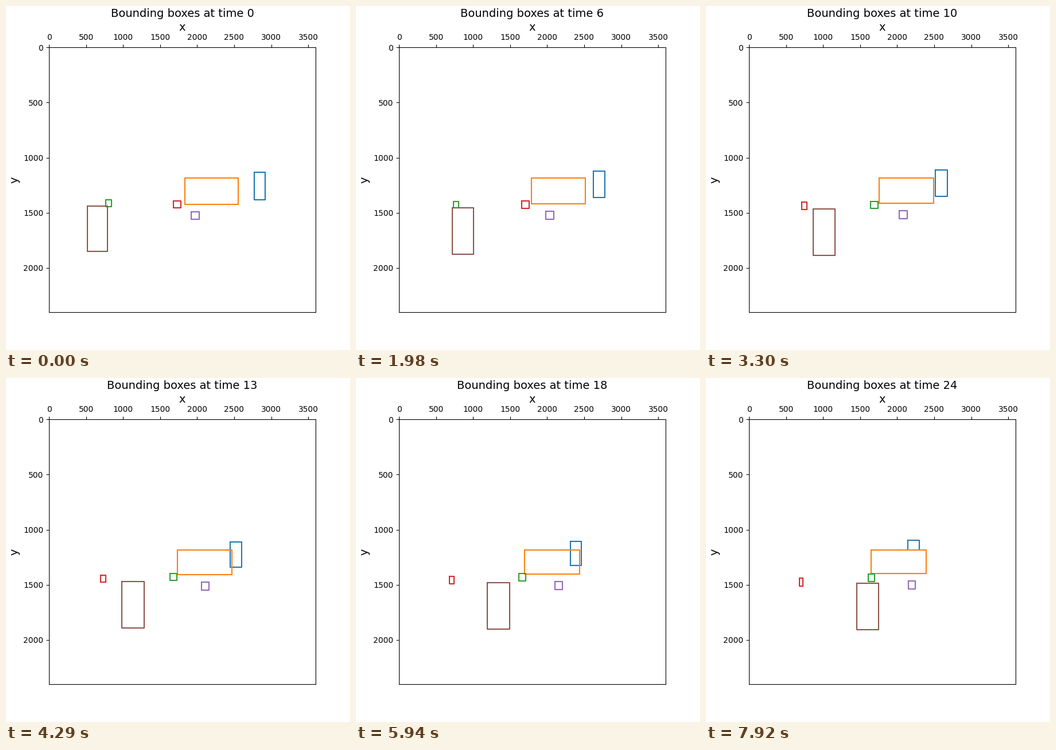
A matplotlib script for the animation above (8 s loop, 600 px wide and 600 px high).

```python
import numpy as np
import matplotlib.pyplot as plt
from matplotlib.animation import FuncAnimation

LOOP, TICK, STEP = 8000, 20, 330
X_MAX, Y_MAX = 3600, 2400
LEFT, TOP, WIDTH, HEIGHT = 75, 72, 465, 462

# Edge positions in stage pixels at these times; a cubic runs through each row.
KEY_TIMES = [0, 8, 16, 24]
TRACKS = {
    "tower": dict(left=[433, 407, 380.4, 352], right=[451.7, 427.6, 400.3, 371.8],
                  top=[290, 287, 285, 283], bottom=[338, 332.7, 328, 323]),
    "wide": dict(left=[312, 304, 296, 288], right=[405, 398.6, 391.8, 384.4],
                 top=[300, 300, 300, 300], bottom=[346, 344.2, 342.4, 340.8]),
    "west": dict(left=[173.8, 168.6, 164, 163], right=[184, 177, 172, 169.2],
                 top=[338.3, 341.4, 345.2, 349.2], bottom=[350, 354, 358, 362.6]),
    "mid": dict(left=[292, 288, 285, 283], right=[305, 301, 297, 294],
                top=[340, 340.6, 341.3, 342], bottom=[352.3, 353, 353.7, 354.6]),
    "low": dict(left=[323, 334, 344.3, 353], right=[337, 348, 357.5, 365],
                top=[359, 357.6, 355.7, 353.6], bottom=[372.4, 371.2, 369.7, 367.7]),
    "tall": dict(left=[141.6, 177.3, 218, 263], right=[177, 215, 257, 301],
                 top=[349, 353, 356, 358.3], bottom=[428.2, 433.9, 437.3, 439.3]),
}
CURVES = {name: {edge: np.polyfit(KEY_TIMES, keys, 3) for edge, keys in edges.items()}
          for name, edges in TRACKS.items()}


def hide_behind(box, front):
    """Cut off the bottom of a box whose whole width is covered."""
    if front["left"] <= box["left"] and front["right"] >= box["right"]:
        box["bottom"] = min(box["bottom"], front["top"])


def boxes_at(time):
    boxes = {name: {edge: np.polyval(c, time) for edge, c in curves.items()}
             for name, curves in CURVES.items()}
    # The wide box only covers the lower part of the tower.
    if boxes["wide"]["right"] >= boxes["tower"]["right"]:
        hide_behind(boxes["tower"], boxes["wide"])
    hide_behind(boxes["west"], boxes["tall"])
    return sorted(boxes.values(), key=lambda b: b["bottom"])


def outline(box):
    l, r, t, b = (box[k] for k in ("left", "right", "top", "bottom"))
    xs = (np.array([l, r, r, l, l]) - LEFT) * X_MAX / WIDTH
    ys = (np.array([t, t, b, b, t]) - TOP) * Y_MAX / HEIGHT
    return xs, ys


fig, ax = plt.subplots(figsize=(6, 6), dpi=100)
ax.set_xlim(0, X_MAX)
ax.set_ylim(Y_MAX, 0)
ax.xaxis.tick_top()
ax.xaxis.set_label_position("top")
ax.set_xlabel("x", fontsize=14)
ax.set_ylabel("y", fontsize=14)
title = ax.set_title("", fontsize=14)
lines = [ax.plot([], [], color=f"C{i}", lw=1.5)[0] for i in range(len(TRACKS))]


def update(frame):
    time = (frame * TICK + TICK // 2) // STEP
    title.set_text(f"Bounding boxes at time {time}")
    # Colours follow the order of the lower edges.
    for line, box in zip(lines, boxes_at(time)):
        line.set_data(*outline(box))
    return [title, *lines]


anim = FuncAnimation(fig, update, frames=LOOP // TICK, interval=TICK,
                     repeat=True, repeat_delay=0, blit=False)
plt.show()
```
